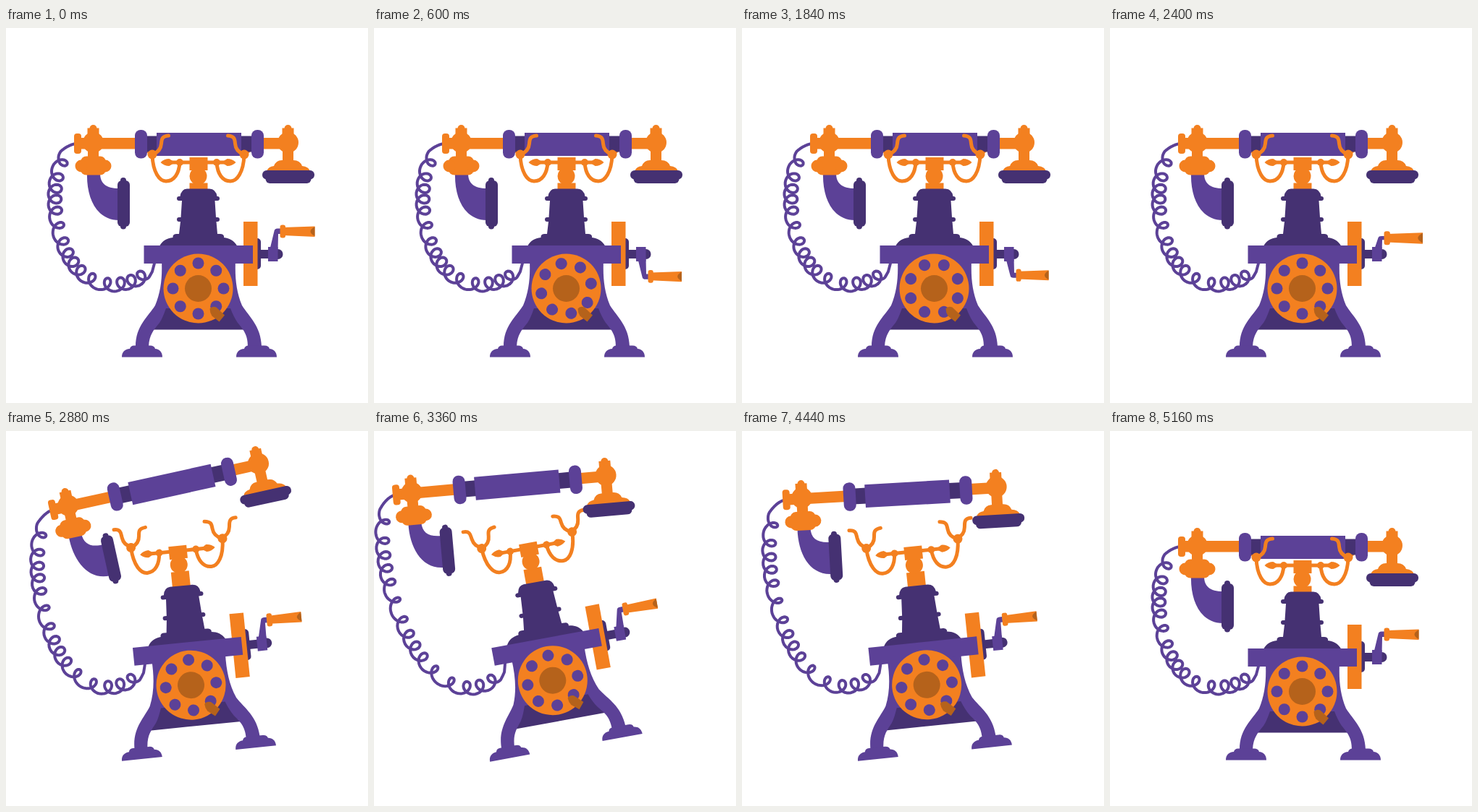
An HTML page that plays this animation: 500 by 519 pixels, repeating every 7000 ms.

```html
<!DOCTYPE html>
<html lang="en">
<head>
<meta charset="utf-8">
<title>Ringing telephone</title>
<style>
  html, body { margin: 0; width: 100%; height: 100%; overflow: hidden; background: #fff; }
  svg { display: block; width: 100%; height: 100%; }
  .purple { fill: #5c4197; }
  .dark { fill: #453172; }
  .orange { fill: #f38020; }
  .brown { fill: #b5621b; }
  .wire { fill: none; stroke: #f38020; stroke-width: 5; stroke-linecap: round; }
  #cord { fill: none; stroke: #5c4197; stroke-width: 4; stroke-linejoin: round; stroke-linecap: round; }
</style>
</head>
<body>
<svg viewBox="0 0 500 519">
  <defs>
    <path id="foot" class="purple" d="M160 455.5c0-7 4-11 11-11.5q1-4.500 6-4.500h22q6 0 7 4.500c6 .5 10 4.500 10 11.500z"/>
    <path id="outerProng" class="wire" d="M181 148C191 148 190 154 191 160C192 168 196 172 203 174"/>
    <g id="hook">
      <path class="wire" d="M224.500 149C215 150 215 154 214.500 160C214 167 210 172 203 174.500M202 176C203 200 212 212 221 212C232 212 239 202 240 186"/>
      <circle class="orange" cx="202" cy="175" r="6.500"/>
      <circle class="orange" cx="240" cy="186" r="5"/>
      <path class="orange" d="M213.500 186q5-5 12-5l8 5-8 5q-7 0-12-5z"/>
    </g>
    <g id="finial" class="orange">
      <circle cx="120.500" cy="139" r="5"/>
      <rect x="112.500" y="138.500" width="16" height="14"/>
      <circle cx="120.500" cy="158.500" r="14.500"/>
    </g>
    <g id="collar">
      <rect class="dark" x="190" y="149.500" width="20" height="22"/>
      <rect class="purple" x="178" y="141" width="17" height="39.500" rx="8"/>
    </g>
  </defs>

  <g id="phone">
    <path id="cord"/>
    <g id="cradleBack">
      <use href="#outerProng"/>
      <use href="#outerProng" transform="matrix(-1 0 0 1 531 0)"/>
    </g>

    <g id="receiver">
      <path class="purple" d="M112 201H130C130 215 138 222 156 222V266C125 266 111 235 112 201z"/>
      <g class="dark">
        <rect x="154" y="211" width="17" height="64" rx="6"/>
        <circle cx="162" cy="211" r="4"/>
        <circle cx="162" cy="274.500" r="4"/>
      </g>
      <g class="orange">
        <rect x="94" y="146" width="10" height="28" rx="4"/>
        <rect x="102" y="152" width="80" height="15.500"/>
        <rect x="352" y="152" width="34" height="15.500"/>
        <rect x="113" y="168" width="15" height="14"/>
        <rect x="103" y="177.500" width="35" height="26" rx="8"/>
        <circle cx="104" cy="191" r="8.500"/>
        <circle cx="137" cy="191" r="8.500"/>
        <rect x="382" y="168" width="15" height="18" rx="3"/>
        <path d="M360 198q2-6 10-7q3-8 11-8h16q9 0 12 8q9 1 11 7z"/>
      </g>
      <use href="#finial"/>
      <use href="#finial" x="269"/>
      <rect class="dark" x="354" y="197" width="72" height="12.500" rx="6"/>
      <rect class="dark" x="358.500" y="201" width="63" height="14" rx="6"/>
      <use href="#collar"/>
      <use href="#collar" transform="matrix(-1 0 0 1 534 0)"/>
      <rect class="purple" x="208" y="145" width="117" height="32"/>
    </g>

    <g id="cradle">
      <rect class="orange" x="253.500" y="214.500" width="25" height="24"/>
      <circle class="orange" cx="265.500" cy="205" r="12"/>
      <path class="wire" d="M222 186H309"/>
      <rect class="orange" x="253.500" y="179" width="25" height="18"/>
      <use href="#hook"/>
      <use href="#hook" transform="matrix(-1 0 0 1 531 0)"/>
    </g>

    <path class="dark" d="M212 302C216 294 222 291 230.500 290V288q1-3 5-3H239L241 268H239a3 3 0 0 1 0-6H241.500L243 239H239a3 3 0 0 1 0-6H240.500Q242 223 250 222.500H281Q290 223 291.500 233H292a3 3 0 0 1 0 6H288.500L290 262H292a3 3 0 0 1 0 6H290.500L292 285H296q4 0 5 3V290C309 291 315 294 319.500 302z"/>

    <rect class="dark" x="340" y="291" width="12" height="43" rx="5"/>
    <rect class="dark" x="350" y="307" width="15" height="12"/>
    <circle class="dark" cx="375.500" cy="313" r="7"/>
    <rect class="orange" x="328" y="268" width="19.500" height="89"/>
    <rect class="purple" x="362" y="303" width="13.500" height="20"/>
    <path id="arm" class="purple" d="M364-5L370.500-32Q371-35.500 375-35.500H379V-28H376L375.500-5z"/>
    <g id="handle">
      <path class="orange" d="M4-5.500L48-7V7.500L4 5.500z"/>
      <path class="brown" d="M48-6.500Q36 0 48 6.500z"/>
      <rect class="orange" x="0" y="-9" width="7.500" height="18" rx="3"/>
    </g>

    <path class="dark" d="M200 417.500H332L309 375H222z"/>
    <path class="purple" d="M215 322H317C316 345 318 365 326 384C336 400 352 412 353 441H334C334 424 328 418 320 408C316 402 313 396 310 388H221C218 396 216 402 212 408C204 418 198 424 197 441H179C179 412 196 400 206 384C214 365 216 345 215 322z"/>
    <rect class="purple" x="190.500" y="301" width="150.500" height="25"/>
    <use href="#foot"/>
    <use href="#foot" x="158"/>

    <g transform="translate(265.500 360.500)">
      <circle class="orange" r="48"/>
      <g id="dial" class="purple"></g>
      <circle class="brown" r="18.500"/>
      <path class="brown" d="M16 28q3-4 9-2L36.500 37L29 46L19 38Q16 33 16 28z"/>
    </g>
  </g>
</svg>

<script>
const $ = id => document.getElementById(id);
const LOOP = 7000, STEP = 40, TURN = 1280, DIAL_END = 2 * TURN;
const REST = { x: 254.5, y: 158 };

// [time, value] keys, eased in and out between neighbours
const tilt = [[2520, 0], [3200, -10.5], [3840, -9.9], [4100, -9.9], [4880, 0]];
const lift = [[2560, 0], [2860, -78], [3880, -75], [4340, -74], [4840, 0]];
const swing = [[2560, 0], [2880, -6.7], [3440, 6], [4160, -6.7], [4540, 4.5], [4800, -4], [5000, 0]];
const pop = [[2560, 0], [2740, -12], [4640, -11], [4840, 0]];

function valueAt(keys, t) {
  if (t <= keys[0][0]) return keys[0][1];
  for (let i = 1; i < keys.length; i++) {
    const [t0, a] = keys[i - 1], [t1, b] = keys[i];
    if (t < t1) return a + (b - a) * (1 - Math.cos(Math.PI * (t - t0) / (t1 - t0))) / 2;
  }
  return keys[keys.length - 1][1];
}

function onReceiver(x, y, rise, degrees) {
  const a = degrees * Math.PI / 180, dx = x - REST.x, dy = y - REST.y;
  return [REST.x + dx * Math.cos(a) - dy * Math.sin(a),
          REST.y + rise + dx * Math.sin(a) + dy * Math.cos(a)];
}

// Turns of the coil at fraction v of the cord; the spacing swells and tightens
function coilTurns(v) {
  const u = 14 * (v - 0.108) / 0.847;
  const turns = u - 0.22 * Math.sin(2 * Math.PI * (u + 0.1) / 5.3);
  return Math.max(-0.5, Math.min(14.5, turns));
}

// A Bezier spine with a looping trochoid wound along it
function cordPath(p0, p1) {
  const p2 = [64, 422], p3 = [202, 337], N = 480;
  const spine = [];
  let length = 0;
  for (let i = 0; i <= N; i++) {
    const t = i / N, u = 1 - t;
    const at = k => u*u*u*p0[k] + 3*u*u*t*p1[k] + 3*u*t*t*p2[k] + t*t*t*p3[k];
    const slope = k => u*u*(p1[k] - p0[k]) + 2*u*t*(p2[k] - p1[k]) + t*t*(p3[k] - p2[k]);
    const x = at(0), y = at(1), tx = slope(0), ty = slope(1), size = Math.hypot(tx, ty);
    if (i) length += Math.hypot(x - spine[i - 1].x, y - spine[i - 1].y);
    spine.push({ x, y, tx: tx / size, ty: ty / size, s: length });
  }
  return 'M' + spine.map(({ x, y, tx, ty, s }) => {
    const v = s / length;
    const r = 9 * Math.max(0, Math.min(1, v / 0.09, (1 - v) / 0.05));
    const angle = 2 * Math.PI * coilTurns(v);
    const out = r * Math.cos(angle), along = r * Math.sin(angle);
    return (x + ty * out - tx * along).toFixed(1) + ' ' + (y - tx * out - ty * along).toFixed(1);
  }).join('L') + 'L206 322';
}

function place(id, transform) { $(id).setAttribute('transform', transform); }

function draw(t) {
  const turn = 360 * Math.min(t, DIAL_END) / TURN, angle = turn * Math.PI / 180;
  const cos = Math.cos(angle), sin = Math.sin(angle);
  place('dial', `rotate(${turn})`);
  place('arm', `translate(0 313) scale(1 ${cos})`);
  place('handle', `translate(378.500 ${313 - 31.5 * cos}) scale(${1 - 0.16 * sin} ${1 - 0.08 * sin})`);

  const rise = valueAt(lift, t), degrees = valueAt(swing, t), up = valueAt(pop, t);
  place('phone', `rotate(${valueAt(tilt, t)} 172 455.500)`);
  place('receiver', `translate(0 ${rise}) rotate(${degrees} ${REST.x} ${REST.y})`);
  place('cradle', `translate(0 ${up})`);
  place('cradleBack', `translate(0 ${up})`);
  $('cord').setAttribute('d', cordPath(onReceiver(97, 160, rise, degrees), onReceiver(38, 188, rise, degrees)));
}

for (let i = 0; i < 8; i++) {
  const hole = document.createElementNS('http://www.w3.org/2000/svg', 'circle');
  hole.setAttribute('cy', -35);
  hole.setAttribute('r', 8);
  hole.setAttribute('transform', `rotate(${45 * i})`);
  $('dial').append(hole);
}

const start = performance.now();
function frame() {
  const t = (performance.now() - start) % LOOP;
  draw(Math.floor(t / STEP) * STEP);
  requestAnimationFrame(frame);
}
frame();
</script>
</body>
</html>
```
